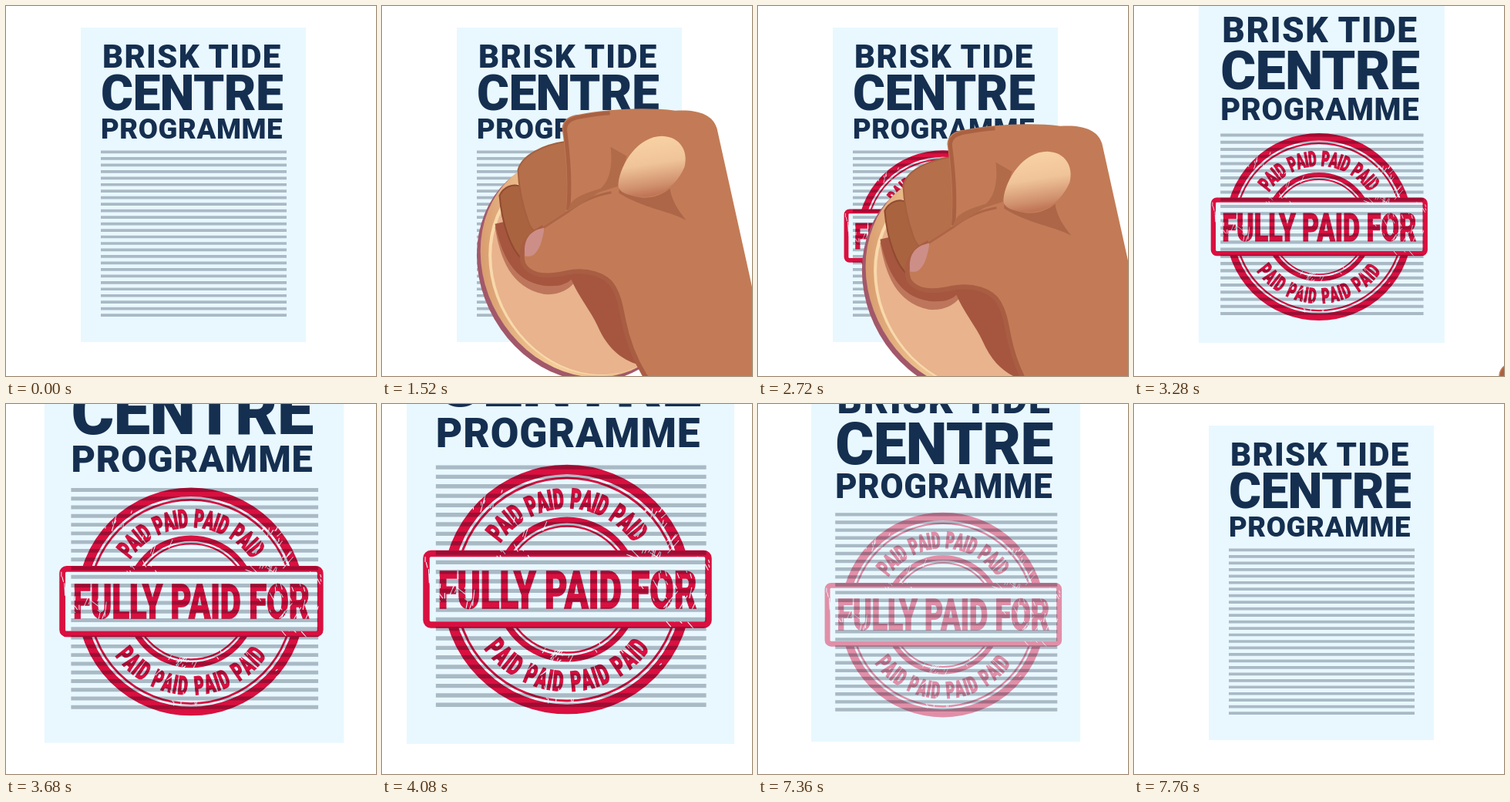
Recreate the animation shown at these times as an HTML page. Size 480x480 px, loop 7840 ms.

```html
<!DOCTYPE html>
<html lang="en">
<head>
<meta charset="utf-8">
<title>Fully paid for</title>
<style>
  html, body { margin: 0; width: 100%; height: 100%; overflow: hidden; background: #fff; }
  svg { display: block; width: 100vw; height: 100vh; }
  text { font-family: Roboto, "Open Sans", sans-serif; font-weight: 900; }
  #title { fill: #152f50; }
  #mark { mix-blend-mode: multiply; fill: none; stroke: #ee1040; }
  #mark text { fill: #ee1040; stroke-width: 1.6; text-anchor: middle; }
</style>
</head>
<body>
<svg viewBox="0 0 480 480">
  <defs>
    <linearGradient id="knob" x1=".45" y1="0" x2=".62" y2="1">
      <stop offset="0" stop-color="#f8d2a4"/>
      <stop offset=".45" stop-color="#f0c499"/>
      <stop offset=".8" stop-color="#d0916e"/>
      <stop offset="1" stop-color="#bb6c50"/>
    </linearGradient>
    <linearGradient id="rim" x1="0" y1="1" x2=".6" y2="0">
      <stop offset="0" stop-color="#c98359"/>
      <stop offset=".45" stop-color="#f5cd99"/>
      <stop offset="1" stop-color="#e0a06e"/>
    </linearGradient>
    <mask id="worn" maskUnits="userSpaceOnUse" x="40" y="60" width="400" height="360">
      <rect x="40" y="60" width="400" height="360" fill="#fff"/>
      <path id="scratches" fill="none" stroke="#000" stroke-width="1.1" stroke-linecap="round"/>
    </mask>
    <mask id="noBand" maskUnits="userSpaceOnUse" x="40" y="60" width="400" height="360">
      <rect x="40" y="60" width="400" height="360" fill="#fff"/>
      <rect x="54" y="190" width="373" height="99" rx="6"/>
    </mask>
  </defs>

  <g id="page">
    <rect x="97" y="28" width="292" height="408" fill="#e9f8ff"/>
    <g id="title">
      <text x="125" y="79.5" font-size="42" letter-spacing="1.3">BRISK TIDE</text>
      <text x="123" y="135" font-size="64" letter-spacing="-.6">CENTRE</text>
      <text x="123" y="171.5" font-size="36.5" letter-spacing=".6">PROGRAMME</text>
    </g>
    <path id="rules" stroke="#a9bac5" stroke-width="3.7"/>
    <!-- drawn at its enlarged size, then shrunk onto the page -->
    <g transform="translate(239.7 425) scale(.68705) translate(-239.7 -424.4)" id="markPlace">
      <g id="mark" mask="url(#worn)">
        <g mask="url(#noBand)">
          <circle cx="240" cy="240" r="155.5" stroke-width="12.5"/>
          <circle cx="240" cy="240" r="144.5" stroke-width="3"/>
          <circle cx="240" cy="240" r="90" stroke-width="8"/>
          <circle cx="240" cy="240" r="82" stroke-width="2.5"/>
        </g>
        <rect x="57.5" y="193.5" width="366" height="92.5" rx="6" stroke-width="8.5"/>
        <text transform="translate(240.5 264) scale(.68 1)" font-size="67">FULLY PAID FOR</text>
        <g id="arcs" transform="translate(240 240)"></g>
      </g>
    </g>
  </g>

  <g id="hand">
    <!-- stamp base -->
    <ellipse transform="translate(262 343) rotate(60)" rx="150" ry="129" fill="#a2586a"/>
    <ellipse transform="translate(265 339) rotate(60)" rx="149" ry="127" fill="url(#rim)"/>
    <ellipse transform="translate(271 342) rotate(60)" rx="143" ry="123" fill="#f8d9ab"/>
    <ellipse transform="translate(273 343) rotate(60)" rx="141" ry="121" fill="#e8b38d"/>
    <path d="M151 288C158 330 172 366 214 375C232 377 246 370 254 360L330 360L220 260Z" fill="#bd765b"/>
    <path d="M151 284C160 326 176 358 214 364C234 366 244 362 250 356C258 376 276 398 284 416C298 448 318 462 342 468L400 560L350 340L210 270Z" fill="#a6563f"/>
    <!-- curled fingers -->
    <path d="M157 247C162 236 174 231 184 235L206 292C192 300 186 312 187 330C172 318 160 284 157 247Z" fill="#a9633f" stroke="#914a31" stroke-width="2"/>
    <path d="M181 214C186 194 215 181 244 177L250 264L214 290C204 298 198 292 194 280C186 258 182 238 181 214Z" fill="#b56f4b" stroke="#a5603f" stroke-width="2"/>
    <!-- fist and arm -->
    <path d="M238 160C239 149 247 143 260 142C298 135 345 132 385 137C414 135 434 142 439 160L480 345L533 585L560 720L480 720C430 600 385 530 345 480C330 455 322 430 318 410C314 390 312 378 305 366C296 350 270 342 245 347C220 354 195 352 186 336C180 318 190 298 212 288L243 268C246 235 244 200 238 160Z" fill="#c27b56"/>
    <path d="M300 140C285 141 273 143 262 145C250 147 242 151 242 162C247 200 249 235 246 266" fill="none" stroke="#aa6142" stroke-width="5"/>
    <path d="M214 288C190 300 182 318 188 336C197 352 220 353 245 347C270 342 296 350 305 366C312 378 314 390 318 410C322 430 330 455 345 480C385 530 430 600 480 720" fill="none" stroke="#a95d43" stroke-width="6"/>
    <path d="M212 290L246 268C262 255 280 247 302 243" fill="none" stroke="#ad6546" stroke-width="3"/>
    <path d="M301 184L322 196L311 235L286 243L246 268C247 252 262 246 288 238C300 228 304 208 301 184Z" fill="#b26b49"/>
    <path d="M312 238C335 256 362 252 378 238C380 252 388 266 399 279C374 266 344 264 312 244Z" fill="#ad6648"/>
    <path d="M311 232C314 205 337 170 368 170C392 171 402 190 397 210C386 235 365 250 340 248C322 248 310 242 311 232Z" fill="url(#knob)"/>
    <path d="M190 326C187 306 195 292 215 289C213 304 208 324 196 326Z" fill="#cd8e88"/>
  </g>
</svg>
<script>
  const LOOP = 7840, STEP = 80, ZOOM = 1.4555;
  const PRESSED = { x: -44, y: -86 }, AWAY = { x: 240, y: 325 };
  const $ = id => document.getElementById(id);

  const ramp = (t, from, to) => Math.min(1, Math.max(0, (t - from) / (to - from)));
  const ease = p => (1 - Math.cos(Math.PI * p)) / 2;
  const mix = (a, b, p) => a + (b - a) * p;

  function drawRules() {
    let d = "";
    for (let i = 0; i < 26; i++) d += `M123 ${189.4 + i * 8.47}H364`;
    $("rules").setAttribute("d", d);
  }

  // side 1 reads over the top of the ring, -1 under its bottom
  function drawArc(words, radius, side) {
    const pen = document.createElement("canvas").getContext("2d");
    pen.font = '900 36px Roboto, "Open Sans", sans-serif';
    const width = c => pen.measureText(c).width + (c === " " ? 5 : 0);
    const total = [...words].reduce((sum, c) => sum + width(c), 0);
    const span = 110;
    let angle = -span / 2, out = "";
    for (const c of words) {
      const half = width(c) / total * span / 2;
      angle += half;
      if (c !== " ")
        out += `<text font-size="36" transform="rotate(${angle * side}) translate(0 ${-radius * side}) scale(.6 1)">${c}</text>`;
      angle += half;
    }
    $("arcs").innerHTML += out;
  }

  // clusters of short strokes scattered round the rings
  function drawScratches() {
    let seed = 11, d = "";
    const rnd = () => (seed = seed * 16807 % 2147483647) / 2147483647;
    for (let patch = 0; patch < 22; patch++) {
      const turn = rnd() * 2 * Math.PI, r = 60 + rnd() * 105, dir = 0.5 + rnd() * 2;
      const x = 240 + r * Math.cos(turn) * 1.1, y = 240 + r * Math.sin(turn);
      for (let i = 0; i < 8; i++) {
        const a = dir + (rnd() - .5) * .6, len = 3 + rnd() * rnd() * 28;
        d += `M${x + (rnd() - .5) * 50} ${y + (rnd() - .5) * 30}l${Math.cos(a) * len} ${Math.sin(a) * len}`;
      }
    }
    $("scratches").setAttribute("d", d);
  }

  function render(now) {
    const t = Math.floor(now % LOOP / STEP) * STEP;
    const out = ramp(t, 6880, 7760);
    const s = mix(1, ZOOM, ease(ramp(t, 2940, 4080)) - ease(out));
    $("page").setAttribute("transform", `translate(239.7 425) scale(${s}) translate(-239.7 -425)`);
    $("markPlace").style.display = t >= 2000 && out < 1 ? "" : "none";
    $("mark").style.opacity = 1 - out;

    // the hand slams down, rests, then lifts off along a slight curve
    const lift = 1 - ramp(t, 800, 1640) ** 1.5 + ease(ramp(t, 2400, 3350));
    const x = mix(PRESSED.x, AWAY.x, lift ** 1.25), y = mix(PRESSED.y, AWAY.y, lift);
    $("hand").style.display = lift < 1 ? "" : "none";
    $("hand").setAttribute("transform", `translate(${x} ${y})`);
  }

  drawRules();
  drawArc("PAID PAID PAID PAID", 105.5, 1);
  drawArc("PAID PAID PAID PAID", 132, -1);
  drawScratches();

  const start = performance.now();
  function tick() {
    render(performance.now() - start);
    requestAnimationFrame(tick);
  }
  tick();
</script>
</body>
</html>
```
